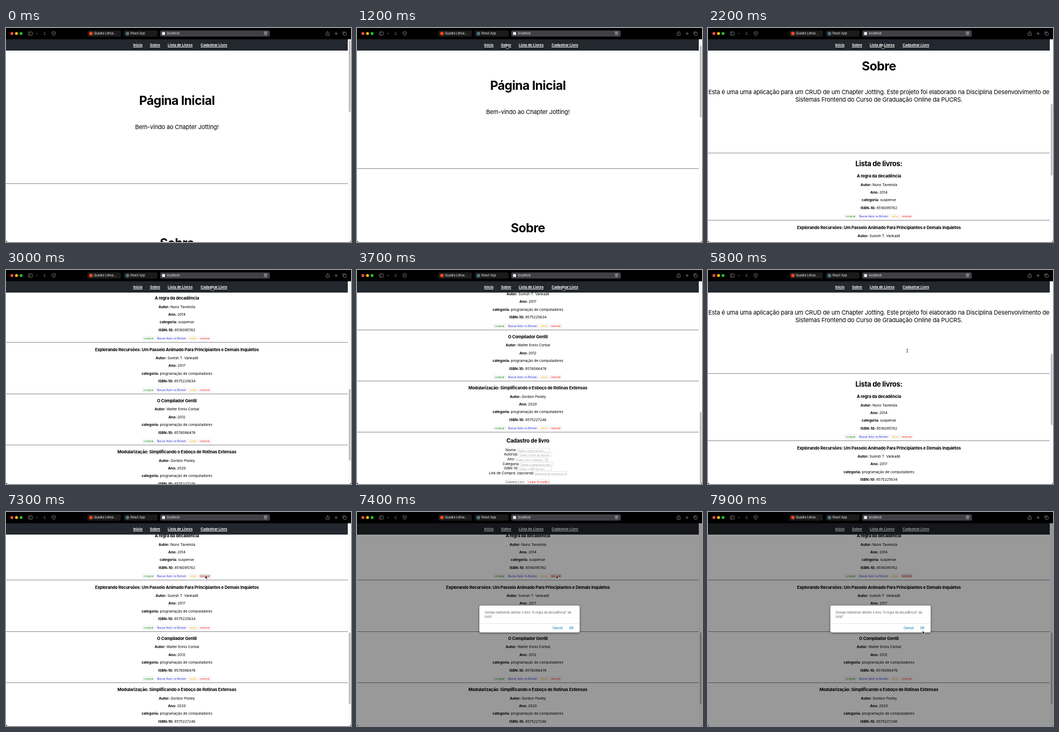
Write an HTML page that moves like this. It is 640x398 px and loops after 8000 ms.

```html
<!DOCTYPE html>
<html lang="pt-BR">
<head>
<meta charset="utf-8">
<title>Livros</title>
<style>
  html, body { margin: 0; width: 100%; height: 100%; overflow: hidden; background: #000; }
  #stage { position: absolute; left: 0; top: 0; width: 640px; height: 398px; overflow: hidden;
    background: #000; font-family: Inter, "Open Sans", sans-serif; color: #000; }
  #stage * { box-sizing: border-box; }
  #view { position: absolute; left: 0; top: 21px; width: 640px; height: 377px; overflow: hidden;
    background: #fff; border-radius: 0 0 4px 4px; }
  #page { position: absolute; left: 0; top: -21px; width: 634px; height: 1069px; will-change: transform; }
  .t { position: absolute; left: -100px; width: 834px; height: 20px; line-height: 20px;
    text-align: center; white-space: pre; letter-spacing: -.01em; }
  .l { left: auto; width: auto; text-align: left; }
  .h { font-weight: 700; letter-spacing: -.025em; }
  .p { letter-spacing: -.015em; }
  hr { position: absolute; left: 0; width: 634px; height: 1px; margin: 0; border: 0; background: #88888e; }
  .b { position: absolute; height: 8px; line-height: 7px; border: .5px solid #ebebeb; border-radius: 2px;
    background: #fff; font-size: 4.7px; text-align: center; white-space: nowrap; }
  .b.hot { background: #e2e2e2; }
  .row { position: absolute; left: 0; width: 634px; height: 9px; line-height: 9px; display: flex;
    justify-content: center; gap: 1px; font-size: 6.65px; letter-spacing: -.01em; white-space: pre; }
  .row i { position: relative; width: 61px; height: 8px; padding-left: 1px; line-height: 8px; overflow: hidden;
    border: .5px solid #e6e6e6; font: 4.7px/8px Inter, sans-serif; color: #aaa; }
  .row svg { position: absolute; left: 54px; top: 0; }
  #nav { position: absolute; left: 0; top: 0; width: 634px; height: 21px; background: #23272e; }
  #nav .t { color: #fff; font-weight: 700; text-decoration: underline; }
  #track { position: absolute; left: 634px; top: 0; width: 6px; height: 377px; background: #fafafa; }
  #thumb { position: absolute; left: 1.5px; top: 2px; width: 3.5px; height: 133px; border-radius: 2px; background: #bcbcbc; }
  #dim { position: absolute; left: 0; top: 0; width: 640px; height: 377px; background: rgba(0,0,0,.4); }
  #box { position: absolute; left: 227px; top: 174px; width: 186px; height: 50px; border-radius: 3px;
    background: #fff; box-shadow: 0 1px 4px rgba(0,0,0,.55); color: #666; }
  #box hr { width: 186px; height: .5px; background: #e4e4e4; }
  #box .a { color: #1481bd; font-weight: 500; }
  #bar { position: absolute; left: 0; top: 0; }
  #tabs .t { color: #ececec; }
  #cur { position: absolute; left: 0; top: 0; overflow: visible; }
</style>
</head>
<body>
<div id="stage">
  <div id="view">
    <div id="page"></div>
    <div id="nav"></div>
    <div id="track"><div id="thumb"></div></div>
    <div id="dim"></div>
  </div>
  <svg id="bar" width="640" height="21" fill="none" stroke="#8a8a8a" stroke-width=".8">
    <g stroke="none">
      <circle cx="11" cy="10.3" r="2.7" fill="#ff5040"/>
      <circle cx="19.5" cy="10.3" r="2.7" fill="#ffb900"/>
      <circle cx="28" cy="10.3" r="2.7" fill="#20c22e"/>
      <rect x="151" y="4.5" width="62" height="11.5" rx="2.5" fill="#1b1b1c"/>
      <rect x="218.5" y="4.5" width="62.5" height="11.5" rx="2.5" fill="#1b1b1c"/>
      <rect x="286" y="4.5" width="203.5" height="11.5" rx="2.5" fill="#404046"/>
      <circle cx="157.5" cy="10.3" r="3.3" fill="#f2441c"/>
      <circle cx="225.3" cy="10.3" r="3.4" fill="#54727c"/>
      <rect x="289.5" y="7.5" width="5.5" height="5.5" rx="1.2" fill="#f2f2f2"/>
    </g>
    <rect x="41.5" y="7.3" width="7.5" height="6" rx="1"/><path d="M44 7.3v6"/>
    <path d="M55.5 9.5l1.7 1.7 1.7-1.7"/>
    <path d="M73.3 7.3l-3 3 3 3" stroke="#a8a8a8"/>
    <path d="M88.5 6.5l3.2 1.2v2.6c0 2-1.5 3.2-3.2 4-1.7-.8-3.2-2-3.2-4V7.7zM87.2 9l2.6 2.6M89.8 9l-2.6 2.6"/>
    <path d="M479 7h5v4h-5zM480 8.3h3M480 9.7h3M478.8 12.8h5" stroke="#b2b2b2"/>
    <path d="M595 9h-1.2v4.7h5.8V9h-1.2M596.7 11.3V6.2M595.2 7.7l1.5-1.5 1.5 1.5"/>
    <path d="M609.5 10.3h5.6M612.3 7.5v5.6"/>
    <path d="M624.8 11.8V7.2h5"/><rect x="626.3" y="8.6" width="5" height="5" rx=".8"/>
  </svg>
  <div id="tabs"></div>
  <div id="box"></div>
  <svg id="cur" width="1" height="1" stroke="#fff" stroke-width=".6" stroke-linejoin="round">
    <path id="arrow" d="M0 0v6.6l1.5-1.4 1 2.3 1.100-.5-1-2.200h2z"/>
    <path id="hand" d="M-.7 0q.7-.8 1.4 0v2.6l2.600.7q.6.300.5 1.200l-.6 2.900h-3.900L-3 4.600q.2-1 1.200-.5l1.100.9z"/>
    <path id="beam" fill="none" stroke="#222" stroke-width=".8" d="M-1.5-3q1.5 0 1.5 1v4q0 1-1.5 1M1.5-3Q0-3 0-2M1.5 3Q0 3 0 2"/>
  </svg>
</div>
<script>
const $ = id => document.getElementById(id);

function add(parent, cls, html, style, tag = 'div') {
  const el = document.createElement(tag);
  el.className = cls;
  el.innerHTML = html;
  for (const k in style) el.style[k] = typeof style[k] === 'number' ? style[k] + 'px' : style[k];
  parent.appendChild(el);
  return el;
}
// y is the middle of the capitals
const mid = (p, y, html, size, cls = '') => add(p, 't ' + cls, html, { top: y - 10, fontSize: size });
const at = (p, x, y, html, size, cls = '') => add(p, 't l ' + cls, html, { left: x, top: y - 10, fontSize: size });
const rule = (p, y) => add(p, '', '', { top: y }, 'hr');
const button = (p, x, y, w, label, color) => add(p, 'b', label, { left: x, top: y - 4, width: w, color });

const page = $('page');
mid(page, 135.3, 'Página Inicial', 23, 'h');
mid(page, 183.5, 'Bem-vindo ao Chapter Jotting!', 11, 'p');
rule(page, 289);
mid(page, 399.5, 'Sobre', 23, 'h');
mid(page, 448, 'Esta é uma uma aplicação para um CRUD de um Chapter Jotting. Este projeto foi elaborado na Disciplina Desenvolvimento de', 11, 'p');
mid(page, 462, 'Sistemas Frontend do Curso de Graduação Online da PUCRS.', 11, 'p');
rule(page, 561);
mid(page, 581, 'Lista de livros:', 13, 'h');

const coding = 'programação de computadores';
const books = [
  ['A regra da decadência', 'Nuno Taveirola', 2014, 'suspense', '8516095762'],
  ['Explorando Recursões: Um Passeio Animado Para Principiantes e Demais Inquietos', 'Suresh T. Vankadil', 2017, coding, '8575225634'],
  ['O Compilador Gentil', 'Walter Ennis Corbal', 2012, coding, '8576086476'],
  ['Modularização: Simplificando o Esboço de Rotinas Extensas', 'Gordon Pexley', 2020, coding, '8575227246']
];
let hot;
books.forEach(([title, ...facts], i) => {
  const y = 604.2 + i * 95.35;
  mid(page, y, title, 7.9, 'h');
  ['Autor', 'Ano', 'categoria', 'ISBN-10'].forEach((k, j) =>
    mid(page, y + 16.3 + j * 14.45, `<b>${k}:</b> ${facts[j]}`, 6.65));
  button(page, 253, y + 75, 23, 'comprar', '#008000');
  button(page, 278.5, y + 75, 57.5, 'Buscar Autor no Bolvem', '#1414d8');
  button(page, 338, y + 75, 18, 'editar', '#ffa500');
  const del = button(page, 358, y + 75, 22, 'remover', '#ff0000');
  hot = hot || del;
  rule(page, Math.round(y + 82));
});

mid(page, 988, 'Cadastro de livro', 10.1, 'h');
const stepper = '<svg width="5" height="8" fill="none" stroke="#555" stroke-width=".8"><path d="M1 3l1.5-1.5L4 3M1 5l1.5 1.5L4 5"/></svg>';
[
  ['Nome:', 'Digite o nome do livro'],
  ['Autor(a):', 'Digite o nome do autor(a)'],
  ['Ano:', 'Digite o ano (4 dígitos)' + stepper],
  ['Categoria:', 'Digite a categoria do livro'],
  ['ISBN-10:', 'Digite o ISBN do livro'],
  ['Link de Compra: (opcional)', 'Digite link de compra do livro']
].forEach(([label, hint], i) =>
  add(page, 'row', `<span>${label}</span><i>${hint}</i>`, { top: 1001.7 + i * 8.6 }));
button(page, 274, 1065.3, 38, 'Cadastrar Livro', '#444');
button(page, 315, 1065.3, 44, 'Limpar Formulário', '#ff0000');

[[236, 'Inicio'], [267, 'Sobre'], [300, 'Lista de Livros'], [361, 'Cadastrar Livro']]
  .forEach(([x, s]) => at($('nav'), x, 10.6, s, 6.7));
[[163, 'Quadra Letiva…'], [231, 'React App'], [298.5, 'localhost']]
  .forEach(([x, s]) => at($('tabs'), x, 10.4, s, 5.65));

const box = $('box');
at(box, 10, 13, 'Deseja realmente deletar o livro "A regra da decadência" da', 5.8);
at(box, 10, 21.3, 'lista?', 5.8);
rule(box, 33);
at(box, 136, 41.7, 'Cancel', 5.7, 'a');
at(box, 166.5, 41.7, 'OK', 5.7, 'a');

const smooth = u => u * u * (3 - 2 * u);

// [start, target, duration]; a new glide takes over from wherever the last one is
const glides = [[1000, 268, 1000], [1865, 540, 1000], [2700, 671, 1000], [5115, 302, 485], [5600, 560, 600]];
function scrollAt(t, n = glides.length - 1) {
  if (n < 0) return 0;
  const [start, target, span] = glides[n];
  if (t < start) return scrollAt(t, n - 1);
  const from = scrollAt(start, n - 1);
  return from + (target - from) * smooth(Math.min(1, (t - start) / span));
}

// [time, value]
const curX = [[200, 335], [900, 277], [1150, 277], [1750, 323.5], [2200, 323.5], [2650, 382],
  [3800, 382], [4500, 369.7], [7400, 369.7], [7900, 398]];
const curY = [[200, 150], [900, 31], [3800, 31], [4500, 150], [6500, 150], [7100, 118], [7400, 118], [7900, 220.5]];
const shapes = [[0, ''], [200, 'arrow'], [800, 'hand'], [3900, 'arrow'], [5500, 'beam'], [5900, 'arrow']];

function value(keys, t) {
  const n = keys.findIndex(k => k[0] > t);
  if (n < 0) return keys[keys.length - 1][1];
  if (n === 0) return keys[0][1];
  const [t0, a] = keys[n - 1], [t1, b] = keys[n];
  return a + (b - a) * smooth((t - t0) / (t1 - t0));
}

function draw(now) {
  const t = Math.floor(now % 8000 / 100) * 100;
  const s = scrollAt(t);
  page.style.transform = `translateY(${-Math.round(s)}px)`;
  $('thumb').style.transform = `translateY(${s * .359}px)`;
  $('dim').style.display = box.style.display = t >= 7400 ? '' : 'none';
  hot.classList.toggle('hot', t >= 7000);
  const shape = shapes.filter(k => k[0] <= t).pop()[1];
  for (const id of ['arrow', 'hand', 'beam']) $(id).style.display = id === shape ? '' : 'none';
  $('cur').style.transform = `translate(${value(curX, t)}px, ${value(curY, t)}px)`;
}

const start = performance.now();
(function tick() {
  draw(performance.now() - start);
  requestAnimationFrame(tick);
})();
</script>
</body>
</html>
```
